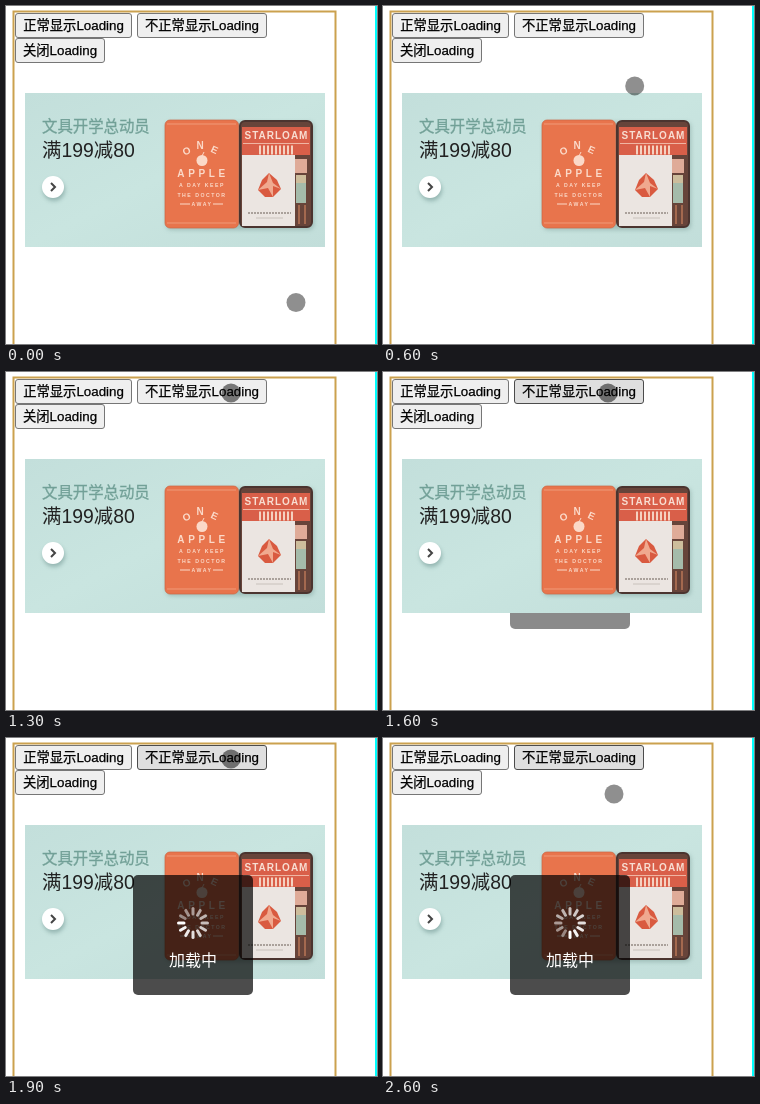
An HTML page for the animation above (2.7 s loop, 371 by 338 pixels).

```html
<!DOCTYPE html>
<html lang="zh">
<head>
<meta charset="utf-8">
<style>
  html, body { margin: 0; width: 100%; height: 100%; overflow: hidden; background: #fff; }
  svg { display: block; font-family: "Liberation Sans", "Noto Sans CJK SC", "Noto Sans CJK JP", sans-serif; }
  .button rect { fill: #efefef; stroke: #767676; }
  .button.pressed rect { fill: #dfdfdf; stroke: #4c4c4c; }
  .button text { font-size: 13.333px; stroke: #000; stroke-width: .25; }
  .cover { fill: #fbd9c8; font-weight: bold; }
  .mid, .button text, .cover text { text-anchor: middle; }
</style>
</head>
<body>
<svg id="stage" width="371" height="338" viewBox="0 0 371 338">
  <defs>
    <linearGradient id="mint" x2="1" y2="1">
      <stop stop-color="#c3dfdb"/><stop offset=".5" stop-color="#c9e5e0"/><stop offset="1" stop-color="#c2deda"/>
    </linearGradient>
    <filter id="soft" x="-50%" y="-50%" width="200%" height="200%"><feGaussianBlur stdDeviation="2"/></filter>
  </defs>
  <path d="M7.500 340V5.500H329.500V340" fill="none" stroke="#cba14f" stroke-width="2"/>
  <path d="M370 0V338" stroke="#0ff" stroke-width="2"/>
  <g id="buttons"></g>

  <g id="banner">
    <rect x="19" y="87" width="300" height="154" fill="url(#mint)"/>
    <text x="36" y="126" font-size="15.4" fill="#72a097" stroke="#72a097" stroke-width=".3">文具开学总动员</text>
    <text x="36" y="151" font-size="19.4" fill="#222">满199减80</text>
    <circle cx="48" cy="184" r="11" fill="#789c98" opacity=".65" filter="url(#soft)"/>
    <circle cx="47" cy="181" r="11" fill="#fff"/>
    <path d="M45 177l4 4l-4 4" fill="none" stroke="#444" stroke-width="2"/>

    <rect x="160" y="116" width="148" height="108" rx="5" fill="#7a9c96" opacity=".5" filter="url(#soft)"/>
    <rect x="159" y="114" width="73.500" height="108" rx="5" fill="#e8744c" stroke="#cc6642" stroke-width=".7"/>
    <path d="M161 118h69M161 217h69" stroke="#f09a78"/>
    <g class="cover">
      <g font-size="10">
        <text transform="translate(182 148) rotate(-25)">O</text>
        <text x="194" y="143">N</text>
        <text transform="translate(207 147) rotate(25)">E</text>
        <text x="197" y="171" letter-spacing="3.6">APPLE</text>
      </g>
      <circle cx="196" cy="154.500" r="5.500"/>
      <path d="M196 150l2-4" stroke="#fbd9c8"/>
      <g font-size="5.2" letter-spacing="1.5">
        <text x="196" y="180.500">A DAY KEEP</text>
        <text x="196" y="191">THE DOCTOR</text>
        <text x="196" y="200">AWAY</text>
      </g>
      <path d="M174 198h10M207 198h10" stroke="#fbd9c8"/>
    </g>

    <rect x="234" y="115" width="72" height="106" rx="5" fill="#67443a" stroke="#4b342f" stroke-width="2"/>
    <path d="M236 121h68v28h-68z" fill="#d95f49"/>
    <text class="mid" x="270.500" y="133" font-size="10" font-weight="bold" letter-spacing="1" fill="#f8ded2">STARLOAM</text>
    <path d="M237 137.500h66" stroke="#f0b5a3"/>
    <path d="M253 144h34" stroke="#f5d1c0" stroke-width="9" stroke-dasharray="2 2"/>
    <rect x="289" y="153" width="12" height="14" fill="#dfab98"/>
    <rect x="290" y="169" width="10" height="8" fill="#cdbd9c"/>
    <rect x="290" y="177" width="10" height="20" fill="#a5bbaa"/>
    <path d="M293 199v19M299 199v19" stroke="#a4694f" stroke-width="2"/>
    <rect x="236" y="149" width="53" height="71" fill="#ebe5e1"/>
    <path d="M263 167l8 7l4 9l-8 8h-8l-7-7l4-10z" fill="#d95a40"/>
    <path d="M263 167l-2 9l-9 8l10-2l5 9v-11l8 3l-8-6z" fill="#f0a98f"/>
    <path d="M242 207h43" stroke="#aaa19b" stroke-width="2" stroke-dasharray="2 1"/>
    <path d="M250 212h27" stroke="#c8c1bb"/>
  </g>

  <g id="popup">
    <rect x="127" y="137" width="120" height="120" rx="5" fill="#000" opacity=".7"/>
    <g id="spinner" stroke="#fff" stroke-width="3" stroke-linecap="round"></g>
    <text class="mid" x="187" y="228" font-size="16" fill="#fff">加载中</text>
  </g>
  <circle id="cursor" r="9.500"/>
</svg>
<script>
const LOOP = 2700, STEP = 100, SPOKES = 12;
const $ = id => document.getElementById(id);
const [stage, buttons, banner, popup, spinner, cursor] =
  ["stage", "buttons", "banner", "popup", "spinner", "cursor"].map($);

const button = (x, y, width, label) => `<g class="button">
  <rect x="${x + .5}" y="${y + .5}" width="${width - 1}" height="24" rx="2.5"/>
  <text x="${x + width / 2}" y="${y + 17}">${label}</text></g>`;
buttons.innerHTML = button(9, 7, 117, "正常显示Loading")
  + button(131, 7, 130, "不正常显示Loading")
  + button(9, 32, 90, "关闭Loading");

spinner.innerHTML = Array.from({ length: SPOKES }, (_, i) =>
  `<path d="M0-9V-14.500" transform="rotate(${i * 360 / SPOKES})" opacity="${.45 + .55 * i / (SPOKES - 1)}"/>`).join("");

function cursorAt(t) {
  if (t > 2400) {
    const p = ((t - 2400) / 200) ** 2;
    return [225 + 6 * p, 21 + 35 * p];
  }
  const u = Math.min(t / 855, 1), p = u * u * (3 - 2 * u);
  return [290 - 65 * p ** 2.2, 296.5 - 275.5 * p];
}

function draw(t) {
  const [x, y] = cursorAt(t);
  cursor.setAttribute("cx", x);
  cursor.setAttribute("cy", y);
  cursor.setAttribute("opacity", y < 33 ? .5 : .44);
  buttons.children[1].classList.toggle("pressed", t >= 1400);

  // The popup starts to fade in behind the banner, then jumps in front.
  stage.insertBefore(popup, t < 1700 ? banner : cursor);
  popup.setAttribute("opacity", t < 1600 ? 0 : t < 1700 ? .65 : 1);
  const turn = Math.floor(t / 1000 * SPOKES) * 360 / SPOKES;
  spinner.setAttribute("transform", `translate(187 185) rotate(${turn})`);
}

function tick() {
  draw(Math.floor(performance.now() % LOOP / STEP) * STEP);
  requestAnimationFrame(tick);
}
tick();
</script>
</body>
</html>
```
